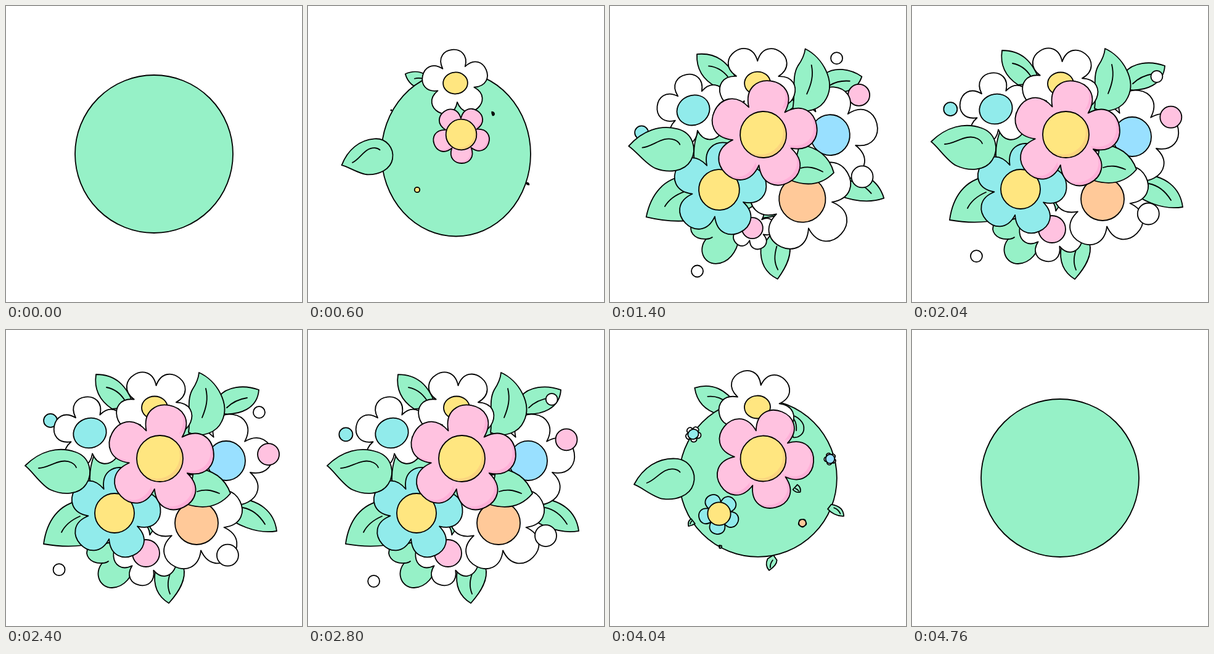
These frames come from a looping animation (480x480 px, 4800 ms). An HTML page with a canvas:

```html
<!DOCTYPE html>
<html>
<head>
<meta charset="utf-8">
<title>Bouquet</title>
<style>
html, body { margin: 0; width: 100%; height: 100%; overflow: hidden; background: #fff; }
canvas { display: block; width: 100vw; height: 100vh; }
</style>
</head>
<body>
<canvas id="stage" width="480" height="480"></canvas>
<script>
const ctx = document.getElementById('stage').getContext('2d');
const LOOP = 4800, STEP = 40, LINE = 1.8, DEG = Math.PI / 180;
const GREEN = '#96f1c7', WHITE = '#fff', PINK = '#ffc2e0', PINK_SHADE = '#ffb0d8';
const YELLOW = '#ffe680', YELLOW_SHADE = '#fcd57f', AQUA = '#91ebeb';
const SKY = '#99e0ff', ORANGE = '#ffc999';

const clamp = v => Math.max(0, Math.min(1, v));
const smooth = v => { v = clamp(v); return v * v * (3 - 2 * v); };
const easeOut = v => 1 - (1 - clamp(v)) ** 2;
const settle = t => 1 - smooth((t - 1300) / 740);

// Five equal petals meeting at notches
function petals(R, base) {
  const p = new Path2D();
  const at = (r, deg) => [r * Math.cos(deg * DEG), r * Math.sin(deg * DEG)];
  p.moveTo(...at(R * 0.57, base - 36));
  for (let i = 0; i < 5; i++) {
    const a = base + i * 72;
    p.bezierCurveTo(...at(R * 1.32, a - 27), ...at(R * 1.32, a + 27), ...at(R * 0.57, a + 36));
  }
  p.closePath();
  return p;
}

function oval(rx, ry, tilt = 0) {
  const p = new Path2D();
  p.ellipse(0, 0, rx, ry, tilt * DEG, 0, 2 * Math.PI);
  return p;
}

function paint(path, fill, scale = 1) {
  ctx.lineWidth = LINE / scale;
  ctx.fillStyle = fill;
  ctx.fill(path);
  ctx.stroke(path);
}

// Lit part is the same shape shifted up and left on screen
function paintShaded(path, fill, shade, scale, angle, shift) {
  ctx.save();
  ctx.clip(path);
  ctx.fillStyle = shade;
  ctx.fill(path);
  ctx.rotate(-angle);
  ctx.translate(-shift, -shift);
  ctx.rotate(angle);
  ctx.fillStyle = fill;
  ctx.fill(path);
  ctx.restore();
  ctx.lineWidth = LINE / scale;
  ctx.stroke(path);
}

function flower(o) {
  const { x, y, R, base, start, dur, spin = 50, tilt = 0, over = 0, dx = 0, dy = 0 } = o;
  const bloom = petals(R, base), core = oval(o.core[0], o.core[1], o.core[2]);
  return t => {
    const sway = settle(t), extra = 1 + over * sway;
    const angle = (tilt * sway + spin * (1 - smooth((t - start) / (dur * 1.5)))) * DEG;
    const layer = (path, fill, shade, scale, turn, shift) => {
      if (scale < 0.01) return;
      ctx.save();
      ctx.translate(x + dx * sway, y + dy * sway);
      ctx.rotate(turn);
      ctx.scale(scale, scale);
      if (shade) paintShaded(path, fill, shade, scale, turn, shift);
      else paint(path, fill, scale);
      ctx.restore();
    };
    layer(bloom, o.fill, o.shade, extra * smooth((t - start - 45) / dur), angle, 5);
    layer(core, o.heart, o.heartShade, extra * smooth((t - start) / dur), tilt * sway * DEG, 5);
  };
}

function leaf(o) {
  const { x, y, start, dur, spin = 0, tilt = 0, ease = smooth } = o;
  const shape = new Path2D(o.shape), vein = new Path2D(o.vein);
  return t => {
    const s = ease((t - start) / dur);
    if (s < 0.01) return;
    ctx.save();
    ctx.translate(x, y);
    ctx.rotate((tilt * settle(t) + spin * (1 - ease((t - start) / (dur * 1.5)))) * DEG);
    ctx.scale(s, s);
    ctx.translate(-x, -y);
    paint(shape, GREEN, s);
    ctx.stroke(vein);
    ctx.restore();
  };
}

// Orbiting bead; angle is given for t = 2040
function bead(fill, r, orbit, angle, speed = 18.6) {
  return t => {
    const s = smooth((t - 850) / 350);
    if (s < 0.01) return;
    const a = (angle + speed * (t - 2040) / 1000) * DEG, d = orbit * (0.7 + 0.3 * s);
    ctx.save();
    ctx.translate(240 + d * Math.cos(a), 240 + d * Math.sin(a));
    paint(oval(r * s, r * s), fill);
    ctx.restore();
  };
}

const BALL_KEYS = [
  [40, 128, 128], [240, 136, 120], [490, 120, 135.5],
  [600, 121, 133.5], [740, 128, 128], [1200, 104, 104]
];
function ball(t) {
  let i = 0;
  while (i < BALL_KEYS.length - 2 && t > BALL_KEYS[i + 1][0]) i++;
  const [t0, w0, h0] = BALL_KEYS[i], [t1, w1, h1] = BALL_KEYS[i + 1];
  const k = smooth((t - t0) / (t1 - t0));
  ctx.save();
  ctx.translate(240, 240);
  paint(oval(w0 + (w1 - w0) * k, h0 + (h1 - h0) * k), GREEN);
  ctx.restore();
}

const pinkBead = bead(PINK, 17.5, 189.5, -18.4);

// Back to front
const scene = [
  leaf({ x: 205, y: 125, start: 250, dur: 600, spin: -28, tilt: -6,
    shape: 'M146 72C176 72 196 88 208 125L172 128C148 112 143 92 146 72Z',
    vein: 'M163 93C174 95 184 101 192 113' }),
  leaf({ x: 265, y: 365, start: 560, dur: 520, spin: 25, tilt: -6,
    shape: 'M264 443C246 432 238 415 242 390L265 365L288 385C293 405 280 425 264 443Z',
    vein: 'M266 428C261 416 262 405 268 390' }),
  ball,
  leaf({ x: 180, y: 350, start: 680, dur: 520, spin: 20,
    shape: 'M134 352C126 365 136 379 156 378C142 395 152 418 172 418C192 417 206 400 210 375L190 340Z',
    vein: 'M156 378Q162 378 166 375' }),
  leaf({ x: 135, y: 310, start: 640, dur: 520, spin: -25, tilt: 4,
    shape: 'M61 347C66 310 85 282 122 276L145 345C120 352 90 352 61 347Z',
    vein: 'M90 328C96 316 106 308 120 302' }),
  leaf({ x: 354, y: 287, start: 500, dur: 700, spin: 20, tilt: -11,
    shape: 'M439 326C435 295 412 274 368 272L352 298C370 314 405 332 439 326Z',
    vein: 'M384 288C400 291 412 302 420 315' }),
  leaf({ x: 345, y: 125, start: 750, dur: 800, spin: 12, tilt: 9,
    shape: 'M410 97C385 88 358 92 345 108L352 136C378 138 408 128 410 97Z',
    vein: 'M391 110C378 112 366 118 358 126' }),
  t => { if (t < 1700) pinkBead(t); },
  bead(AQUA, 11, 192, 202.3),
  flower({ x: 136, y: 167, R: 59, base: -97, core: [27, 24, -20], fill: WHITE, heart: AQUA,
    start: 550, dur: 550, tilt: -5, dx: -1, dy: 2 }),
  flower({ x: 357, y: 212, R: 76, base: -82, core: [31, 32], fill: WHITE, heart: SKY,
    start: 600, dur: 520, tilt: -4, over: 0.03, dy: -3 }),
  leaf({ x: 300, y: 178, start: 510, dur: 600, spin: -25, tilt: 2,
    shape: 'M313 69C342 82 364 120 350 148C342 166 318 176 296 166C300 140 292 115 302 97C308 88 312 80 313 69Z',
    vein: 'M324 95C328 112 325 125 318 142' }),
  flower({ x: 241, y: 126, R: 63, base: -122, core: [21, 18.5], fill: WHITE, heart: YELLOW,
    start: 170, dur: 500, spin: 78, tilt: -4, dx: -2, dy: -1 }),
  flower({ x: 227, y: 362, R: 53, base: 30, core: [22, 22], fill: WHITE, heart: PINK,
    start: 950, dur: 650, spin: 65, dx: 4, dy: -2 }),
  flower({ x: 309, y: 313, R: 79, base: -27, core: [35, 35], fill: WHITE, heart: ORANGE,
    start: 620, dur: 560, tilt: -4, over: 0.08, dx: 3 }),
  flower({ x: 176, y: 297, R: 75, base: -78, core: [32, 32], fill: AQUA, heart: YELLOW,
    start: 488, dur: 500, tilt: -3, over: 0.03, dx: 1, dy: 1 }),
  leaf({ x: 300, y: 255, start: 620, dur: 520, spin: 30, tilt: 5,
    shape: 'M364 265C355 240 335 226 305 224L295 283C325 292 348 284 364 265Z',
    vein: 'M310 262C322 258 332 259 346 265' }),
  flower({ x: 249.5, y: 208.5, R: 88, base: -152, core: [37.5, 37.5], fill: PINK, shade: PINK_SHADE,
    heart: YELLOW, heartShade: YELLOW_SHADE, start: 295, dur: 500, spin: 42, tilt: -2, dx: -1 }),
  leaf({ x: 137, y: 234, start: 100, dur: 900, spin: -50, tilt: -4, ease: easeOut,
    shape: 'M31 220C55 196 85 188 113 198C136 206 142 232 130 250C118 268 92 268 72 259C58 253 42 228 31 220Z',
    vein: 'M53 224C70 224 88 206 106 215Q112 218 114 223' }),
  bead(WHITE, 9.5, 201, -38.7),
  t => { if (t >= 1700) pinkBead(t); },
  bead(WHITE, 17.5, 173, 34.1, 34),
  bead(WHITE, 9.5, 214, 129.3)
];

function frame(now) {
  const time = Math.floor((now % LOOP) / STEP) * STEP;
  const t = Math.min(time, LOOP - time); // second half plays backwards
  ctx.fillStyle = WHITE;
  ctx.fillRect(0, 0, 480, 480);
  ctx.strokeStyle = '#000';
  ctx.lineCap = ctx.lineJoin = 'round';
  scene.forEach(draw => draw(t));
}

const begin = performance.now();
function tick() {
  frame(performance.now() - begin);
  requestAnimationFrame(tick);
}
tick();
</script>
</body>
</html>
```
